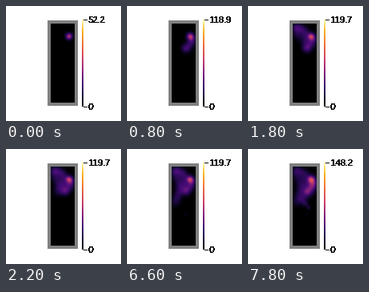
These frames come from a looping animation (144 by 144 pixels, 8 s). A matplotlib script:

```python
import numpy as np
import matplotlib.pyplot as plt
from matplotlib.animation import FuncAnimation
from matplotlib.colors import LinearSegmentedColormap
from matplotlib.patches import Rectangle

plt.rcParams["text.antialiased"] = False

SIZE = 144
STEP_MS = 200
FRAMES = 40
L, R, T, B = 56, 86, 22, 121   # inside of the box

heat = LinearSegmentedColormap.from_list("heat", [
    (0.0, "#000000"), (0.12, "#1b0840"), (0.27, "#480c78"),
    (0.42, "#92277c"), (0.55, "#cc4268"), (0.7, "#ee6a3e"),
    (0.87, "#fbb41c"), (1.0, "#fcfaa8")])

# top of the scale from each step on
SCALES = {0: 52.2, 1: 94.6, 2: 118.9, 5: 119.7, 39: 148.2}

# key points (step, x, y) of the two walks; nothing moves between them
FIRST = [(0, 79, 38), (1, 79, 38), (2, 81.5, 41.5), (4, 73, 53.5),
         (6, 71.5, 33), (8, 60, 27.5), (10, 66, 45), (13, 61, 66)]
SECOND = [(33, 73.5, 81.5), (34, 76, 73.5), (36, 68, 63),
          (38, 81.5, 47), (39, 79.5, 39)]

gx, gy = np.meshgrid(np.arange(L, R) + 0.5, np.arange(T, B) + 0.5)


def smooth(t, keys, values):
    """Cubic Hermite curve through the key values."""
    slope = np.gradient(values, keys)
    i = np.clip(np.searchsorted(keys, t, side="right") - 1, 0, len(keys) - 2)
    h = keys[i + 1] - keys[i]
    u = (t - keys[i]) / h
    ease = u * u * (3 - 2 * u)
    return (values[i] * (1 - ease) + values[i + 1] * ease
            + h * slope[i] * u * (1 - u) ** 2
            - h * slope[i + 1] * u * u * (1 - u))


def bump(x, y, dx, dy, size, weight):
    """A soft spot, longer and wider the faster it moves."""
    speed = np.hypot(dx, dy)
    c, s = (dx / speed, dy / speed) if speed else (1, 0)
    along = ((gx - x) * c + (gy - y) * s) / (size * (2.8 + 0.25 * speed))
    across = ((gy - y) * c - (gx - x) * s) / (size * (2.8 + 0.12 * speed))
    return weight * np.exp(-(along ** 2 + across ** 2) / 2)


def walk(points, size, weight):
    """Heat left at each step; size and weight are (start, end, rate)."""
    keys, xs, ys = np.array(points, float).T
    steps = np.arange(keys[0], keys[-1] + 1)
    x, y = smooth(steps, keys, xs), smooth(steps, keys, ys)
    dx, dy = np.gradient(x), np.gradient(y)
    return {int(n): bump(x[k], y[k], dx[k], dy[k], size(k), weight(k))
            for k, n in enumerate(steps)}


spots = {
    **walk(FIRST, lambda k: 1, lambda k: 25 - k),
    **walk(SECOND, lambda k: min(1, 0.2 + 0.25 * k),
           lambda k: min(22, 12 + 3 * k)),
}


def heat_at(step):
    return sum(spot for n, spot in spots.items() if n <= step)


def scale_at(step):
    return SCALES[max(n for n in SCALES if n <= step)]


fig = plt.figure(figsize=(2, 2), dpi=72, facecolor="white")
ax = fig.add_axes([0, 0, 1, 1])
ax.axis("off")


def block(x, y, w, h, color):
    ax.add_patch(Rectangle((x, y), w, h, fc=color, lw=0, antialiased=False))


def label(y, text):
    """Text struck twice, one pixel apart."""
    return [ax.text(x, y, text, fontsize=11, family="Liberation Sans",
                    color="black", va="baseline") for x in (103, 104)]


block(52, 18, 38, 107, "#808080")
image = ax.imshow(heat_at(0), cmap=heat, extent=(L, R, B, T),
                  interpolation="nearest", zorder=2)

# colour bar with its two ticks
ramp = np.linspace(1, 0, 109)[:, None]
ax.imshow(ramp, cmap=heat, extent=(95, 97, 126, 17),
          interpolation="nearest", zorder=2)
for tick in (17, 126):
    block(97, tick, 5, 1, "black")
top_label = label(21, "")
label(130, "0")

ax.set_xlim(0, SIZE)
ax.set_ylim(SIZE, 0)
ax.set_aspect("auto")


def draw(step):
    top = scale_at(step)
    image.set_data(heat_at(step))
    image.set_clim(0, top)
    for text in top_label:
        text.set_text(f"{top:.1f}")
    return [image, *top_label]


anim = FuncAnimation(fig, draw, frames=FRAMES, interval=STEP_MS,
                     init_func=lambda: draw(0), repeat=True, repeat_delay=0)
plt.show()
```
